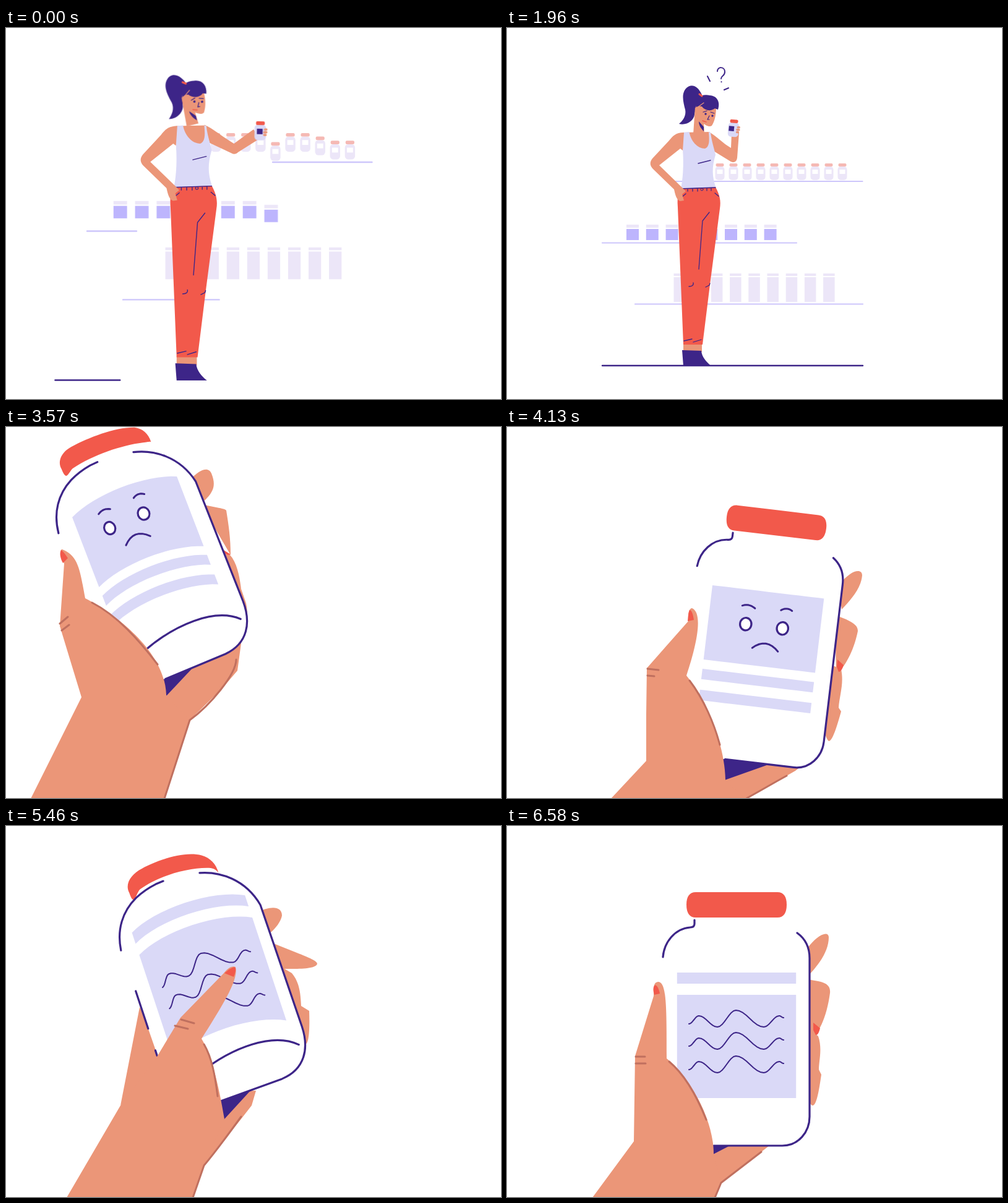
Write an HTML page that moves like this. It is 800 px wide and 600 px high and loops after 6650 ms.

```html
<!DOCTYPE html>
<html lang="en">
<head>
<meta charset="utf-8">
<title>Reading the label</title>
<style>
html, body { margin: 0; width: 100%; height: 100%; overflow: hidden; background: #fff; }
svg { display: block; width: 800px; height: 600px; }
</style>
</head>
<body>
<svg viewBox="0 0 800 600">
  <filter id="rough" filterUnits="userSpaceOnUse" x="0" y="0" width="800" height="600" color-interpolation-filters="sRGB">
    <feTurbulence id="noise" type="fractalNoise" baseFrequency=".04" numOctaves="1"/>
    <feDisplacementMap in="SourceGraphic" scale="1.3" xChannelSelector="R" yChannelSelector="G"/>
  </filter>
  <g id="stage" filter="url(#rough)" stroke-linecap="round" stroke-linejoin="round"></g>
</svg>
<script>
const LOOP = 6650, STEP = 70, CUT = 3360;
const SKIN = '#eb9678', RED = '#f2594b', INK = '#3d2588', LILAC = '#dad9f7',
      BROWN = '#c0705f', PALE = '#ece6f8', VIOLET = '#bdb5fd', SHELF = '#cdc6fb', PINK = '#f5b9b4';

const clamp = (x, a = 0, b = 1) => Math.min(b, Math.max(a, x));
const span = (t, a, b) => clamp((t - a) / (b - a));
const lerp = (a, b, t) => a + (b - a) * t;
const inOut = t => t * t * (3 - 2 * t);
const out = t => 1 - (1 - t) ** 3;
const backOut = t => 1 + 3.2 * (t - 1) ** 3 + 2.2 * (t - 1) ** 2;
const NUM = /-?\d+(\.\d+)?/g;

// Blend two paths that share the same commands
function mix(a, b, t) {
  const to = b.match(NUM);
  let i = 0;
  return a.replace(NUM, n => lerp(+n, +to[i++], t).toFixed(2));
}
function shift(d, dx, dy) {
  let i = 0;
  return d.replace(NUM, n => +n + (i++ % 2 ? dy : dx));
}
const fill = (d, color) => `<path d="${d}" fill="${color}"/>`;
const line = (d, color, width) => `<path d="${d}" fill="none" stroke="${color}" stroke-width="${width}"/>`;
const rect = (x, y, w, h, color, r = 0) =>
  `<rect x="${x}" y="${y}" width="${w}" height="${h}" rx="${r}" fill="${color}"/>`;
const group = (transform, body) => `<g transform="${transform}">${body}</g>`;

// ---------- Woman and shelves ----------

const ARM_OUT = 'M326,167 C338,172 350,183 370,195 L399,174 L409,187 L376,208 C373,211 370,211 366,209 L334,194Z';
const ARM_BENT = 'M326,168 C338,174 348,186 362,194 L363,170 L375,170 L372,210 C371,217 366,219 360,215 L334,199Z';

function shelves(t, p) {
  const row = (count, item, lift) => Array.from({ length: count }, (_, i) =>
    group(`translate(0 ${lift(i) * (1 - out(span(t, i * 20, 420 + i * 20)))})`, item(i))).join('');
  const hover = [-13, -13, -13, -13, 0, -13, -13, -8, -2, -2];
  const jars = row(10, i => {
    const x = 344 + 22 * i;
    return rect(x - 7.5, 224, 15, 22, PALE, 5) + rect(x - 6.5, 219, 13, 5, PINK, 2) + rect(x - 4.5, 229, 9, 7, '#fff');
  }, i => hover[i]);
  const boxes = row(8, i => {
    const x = 193 + 31.8 * i;
    return rect(x, 318, 20, 5, PALE) + rect(x, 325, 20, 18, VIOLET);
  }, i => i < 7 ? -14 : -8.5);
  const tubes = row(9, i => {
    const x = 269.5 + 30.2 * i;
    return rect(x, 397, 18.5, 4, PALE) + rect(x, 403, 18.5, 40, PALE);
  }, () => -26);
  const board = (x0, x1, y) => line(`M${x0},${y} H${x1}`, SHELF, 2.2);
  const k = 1 - p;
  return group(`translate(${-37.6 * k} ${-60.7 * k}) scale(${1 + .095 * k} ${1 + .12 * k})`,
    jars + boxes + tubes + board(lerp(428, 271, p), 574.5, 248) +
    board(154, lerp(227, 468, p), 347.5) + board(207, lerp(349, 575, p), 446.5));
}

function head(q) {
  const k = 1 - q;
  return group(`translate(${-3 * k} ${-4 * k}) rotate(${-14 * k} 308 165)`,
    fill('M315,108 C308,92 297,90 290,97 C281,106 285,120 288,132 C290,142 284,150 278,155 C290,158 302,150 303,140 C305,130 308,118 315,108Z', INK) +
    fill('M304,128 L301,172 L319,172 L318,152Z', SKIN) +
    fill('M310,151 L318,160 L318,167 C314,163 310,158 310,151Z', INK) +
    fill('M308,120 L338,128 C338,140 336,150 331,158 C327,161 320,157 316,153 C308,150 303,142 304,131Z', SKIN) +
    fill('M306,128 C304,114 312,106 328,109 C340,110 345,120 341,132 L336,130 C330,135 320,134 315,127 L310,126Z', INK) +
    line('M311,126 L318,121', SKIN, 1.2) + line('M311,107 L315,110', RED, 3) +
    line('M317,136 L323,134 M329,136 L335,138 M327,142 L324,148 L327,148', INK, 1.2) +
    line('M316,150 L322,152', RED, 1.4) +
    `<circle cx="321" cy="139" r="1.7" fill="${INK}"/><circle cx="332" cy="142" r="1.7" fill="${INK}"/>`);
}

function heldJar(q) {
  return group(`translate(${lerp(409, 366, q)} ${lerp(177, 163, q)}) rotate(${lerp(1, 5, q)})`,
    rect(-8.5, -10, 17, 23, LILAC, 5) + rect(-6.5, -15, 13, 5.5, RED, 2) + rect(-5 - 2.5 * q, -4, 8.5, 8, INK) +
    line('M7,-3 H9 M6,1 H9 M6,5 H8', SKIN, 3.4));
}

function woman(t, p, q) {
  const k = 1 - p, pop = backOut(span(t, 1050, 1330));
  const ink = d => line(d, INK, 1.3);
  const ground = line(`M${lerp(105, 154, p)},546 H${lerp(201, 575, p)}`, INK, 2.4);
  const body =
    fill('M285,510 H315 V524 H285Z', SKIN) +
    fill('M283,521 L314,522 C315,532 322,540 330,546.5 L285,546.5Z', INK) +
    fill(mix(ARM_OUT, ARM_BENT, q), SKIN) +
    fill('M284,169 L328,168 L332,200 L285,205Z', SKIN) +
    fill('M285,169 L294.5,168 C297,183 308,195 320,195 C328,192 327,180 326,168 L329,169 C331,185 335,195 337,205 C331,225 331,240 338,259 L281,260 C286,235 285,210 284,195Z', LILAC) +
    fill('M277,260 L337,257.5 C344,270 346,280 344,292 L328,415 L316,512 L285,512 L276,290 C275,280 276,270 277,260Z', RED) +
    ink('M309,219 L329,214 M278,260 L337,258 M292,260 V264 M300,260 V264 M308,260 V264 M323,259 V263 M330,259 V263') +
    ink('M283,273 L289,268 M336,267 L342,272 M327,298 L316,312 L310,390 M294,418 C299,418 302,416 301,412 M321,419 L327,416 L328,413 M286,506 L299,503 M301,508 L314,504') +
    `<circle cx="315" cy="261" r="2" fill="none" stroke="${INK}"/>` +
    fill('M286,169 C272,169 268,175 262,182 L235,211 C230,217 231,223 236,228 L270,261 C272,270 274,278 280,280 L286,279 L283,269 L289,264 L283,258 L246,222 L280,195 L284,198Z', SKIN) +
    head(q) + heldJar(q);
  const doubt = t < 1050 ? '' : group(`translate(335 100) scale(${pop}) translate(-335 -100)`,
    line('M340,70 C340,62 352,62 352,71 C352,78 346,77 346,82 M346.5,87 V87.3 M324,78 L328,86 M351,100 L358,97', INK, 2));
  return group(`translate(${-34.9 * k} ${-25.6 * k}) scale(${1 + .09 * k})`, ground + body + doubt);
}

// ---------- Bottle, drawn around its own centre ----------

const FLAT = {
  cap: 'M-81,-203 C-81,-216 -76,-223 -66,-223 C-22,-223 22,-223 66,-223 C76,-223 81,-216 81,-203 C81,-189 76,-182 66,-182 C22,-182 -22,-182 -66,-182 C-76,-182 -81,-189 -81,-203Z',
  left: 'M-68,-178 L-68,-172 Q-68,-166 -75,-166 C-100,-164 -117,-142 -119,-118',
  right: 'M98,-157 C112,-147 118,-132 118,-116 L118,140 C118,165 100,187 74,187 L-37,187',
  side: 'L-118,187 L-119,-118 C-117,-142 -100,-164 -75,-166 L-68,-178Z',
  base: 'M-37,187 C0,187 40,187 74,187'
};
const TILTED = {
  cap: 'M-80,-160 C-83,-176 -68,-188 -48,-191 C-20,-196 25,-197 50,-181 C62,-173 68,-160 67,-146 C64,-153 62,-155 55,-158 C25,-169 -25,-172 -62,-160 C-70,-156 -80,-134 -80,-160Z',
  left: 'M-22,-161 L-35,-160 Q-55,-157 -72,-149 C-100,-135 -118,-110 -122,-76',
  right: 'M38,-155 C70,-147 105,-122 115,-75 L117,133 C117,170 100,200 60,203 L-45,206',
  side: 'L-118,187 L-122,-76 C-118,-110 -100,-135 -72,-149 L-22,-161Z',
  base: 'M-62,152 C0,129 70,127 103,159'
};
const WAVE = [[-77, -10], [-61, -23], [-31, -5], [-1, -32], [44, -5], [69, -23], [76, -20]];

function bottle([x, y, turn, tilt, spin, capTilt]) {
  const R = 118, rad = Math.PI / 180;
  const shape = (name, s = tilt) => mix(FLAT[name], TILTED[name], s);
  const onSurface = (deg, h) => {
    const a = clamp(deg, -90, 90) * rad;
    return `${(R * Math.sin(a)).toFixed(2)},${(h + 45 * tilt * (.58 - Math.cos(a))).toFixed(2)}`;
  };
  const degOf = u => Math.asin(u / R) / rad;
  const band = (mid, half, top, bottom) => {
    const pts = [];
    for (let i = -8; i <= 8; i++) pts.push(onSurface(mid + half * i / 8, top));
    for (let i = 8; i >= -8; i--) pts.push(onSurface(mid + half * i / 8, bottom));
    return fill('M' + pts.join('L') + 'Z', LILAC);
  };
  const trace = (mid, pts, width) =>
    line('M' + pts.map(([u, v]) => onSurface(mid + degOf(u), v)).join('L'), INK, width);
  const arc = (u0, v0, u1, v1, rise) => Array.from({ length: 9 }, (_, i) => {
    const s = i / 8;
    return [lerp(u0, u1, s), lerp(v0, v1, s) - rise * 4 * s * (1 - s) - 4 * tilt];
  });
  const wave = dy => WAVE.slice(1).flatMap(([u1, v1], j) => {
    const [u0, v0] = WAVE[j];
    return Array.from({ length: 9 }, (_, i) =>
      [lerp(u0, u1, i / 8), lerp(v0, v1, (1 - Math.cos(Math.PI * i / 8)) / 2) + dy]);
  });

  let labels = '';
  if (spin < 130) {
    labels += band(spin, 50.3, -90, 31) + band(spin, 50.3, 46, 63) + band(spin, 50.3, 80, 97);
    const face = spin - 5 * tilt;
    for (const side of [-14.7, 14.7]) {
      const deg = face + side;
      if (deg > 85) continue;
      const [cx, cy] = onSurface(deg, -34 - 4 * tilt).split(',');
      labels += `<ellipse cx="${cx}" cy="${cy}" rx="${9.5 * Math.cos(deg * rad)}" ry="10.2" fill="#fff" stroke="${INK}" stroke-width="3.2"/>`;
    }
    labels += trace(face, arc(-39, -63, -18, -61, 3), 3) + trace(face, arc(24, -63, 42, -64, 3), 3) +
      trace(face, arc(-15, 3, 27, 4, 10), 3);
  }
  if (spin > 5) {
    const mid = spin - 135, grow = 1 + .05 * tilt;
    labels += band(mid, 54.6, -93 * grow, -75 * grow) + band(mid, 54.6, -57 * grow, 110 * grow);
    for (const dy of [0, 36, 74]) labels += trace(mid, wave(dy + 20 * tilt), 2);
  }
  const body = shape('right') + shape('side');
  const edge = tilt > .9 && spin > 40 ? line('M-120,-6 V58 M-120,95 V104', INK, 3.2) : '';
  return group(`translate(${x} ${y}) rotate(${turn})`,
    `<clipPath id="body"><path d="${body}"/></clipPath>` +
    fill(shape('cap', capTilt), RED) + fill(body, '#fff') + `<g clip-path="url(#body)">${labels}</g>` +
    line(shape('left') + shape('right') + shape('base'), INK, 3.2) + edge);
}

// ---------- Hand poses; bottle: x, y, turn, tilt, spin, cap tilt ----------

const LOW = {
  bottle: [226, 199, -21, 1, -1, .75],
  hand: 'M40,601 L122,437 L104,378 L87,322 L94,221 C88,205 87,197 91,198 C118,208 120,235 128,277 C190,310 258,370 259,434 L297,474 L256,601Z',
  palm: 'M256,601 L297,474 L350,422 L374,394 L382,335 L280,330 L230,590Z M122,437 L130,380 L150,400Z',
  gap: 'M252,402 L306,385 L259,435Z',
  web: 'M139,284 C180,305 215,345 245,384',
  rim: 'M372,376 C372,400 330,450 297,474 L256,601',
  crease: 'M87,318 L100,307 M90,329 L102,320',
  nail: 'M89,199 C94,202 97,208 100,212 L92,220 C88,213 86,204 89,199Z',
  fingers: 'M295,88 C315,65 328,65 332,75 C340,95 335,105 321,119Z M315,125 L340,130 C350,132 355,133 356,135 C360,160 363,180 363,207Z M345,200 L362,207 C374,220 378,245 380,262 L388,285 C391,300 391,320 386,322 C382,320 378,315 370,300Z',
  tip: 'M350,198 L363,206 C360,208 357,206 355,205 L350,202Z'
};
const FRONT = {
  bottle: [411.5, 356, 6.8, 0, 0, 0],
  hand: 'M168,601 L225,540 L225,465 L226,390 L293,314 C292,300 295,293 299,293 C316,300 309,345 290,402 C320,440 352,510 353,571 L385,601 L385,601Z',
  palm: 'M380,601 L388,601 L452,564 L466,556 L480,545 L330,520 L330,601Z M225,540 L240,450 L270,430Z',
  gap: 'M345,530 L428,544 L352,571Z',
  web: 'M295,410 C318,440 335,480 344,514',
  rim: 'M452,564 C430,576 410,588 388,600 L386,602',
  crease: 'M227,391 L245,393 M227,402 L238,403',
  nail: 'M295,296 C299,296 301,305 302,312 L292,314 C293,306 293,300 295,296Z',
  fingers: 'M535,258 C555,230 574,228 574,240 C572,262 555,280 541,295Z M530,304 L548,311 C562,318 567,322 567,330 C562,355 550,385 532,400Z M525,385 L540,392 C545,415 537,435 536,454 L540,460 C533,485 526,508 520,508 C516,505 514,495 510,485Z',
  tip: 'M534,376 L544,385 C542,392 539,396 536,396 L533,388Z'
};
const BACK = {
  bottle: [325.5, 235, -18.3, 1, 135, 1],
  hand: 'M98,601 L185,452 L244,373 L282,310 L352,238 C360,228 366,226 371,228 C375,245 362,272 316,344 C332,370 344,420 353,474 L320,549 L302,601Z',
  palm: 'M302,601 L320,549 L383,470 L397,452 L404,428 L340,430 L290,560Z M185,452 L216,293 L260,373Z',
  gap: 'M345,440 L395,428 L352,475Z',
  web: 'M320,353 C333,375 338,405 342,437',
  rim: 'M380,470 C362,495 340,525 320,549 L302,601',
  crease: 'M283,313 L304,319 M273,323 L294,328',
  nail: 'M366,229 C372,226 373,232 368,244 L353,238 C358,234 361,231 366,229Z',
  fingers: 'M405,140 C425,130 446,128 446,145 C444,155 436,165 428,172Z M425,187 L470,205 C490,213 503,218 503,223 C500,232 470,231 445,231Z M440,225 L462,238 C474,252 476,270 477,291 L490,299 C491,325 490,352 484,353 C480,353 476,340 470,330Z',
  tip: 'M405,150 L410,150 C412,152 412,154 411,156 L406,154Z'
};
const TURNING = Object.fromEntries(Object.entries(BACK).map(([k, v]) => [k, k === 'bottle' ? v : shift(v, 2, 8)]));
Object.assign(TURNING, {
  bottle: [328, 253, -17, 1, 78, 1],
  gap: shift(BACK.gap, 5, 10),
  fingers: 'M410,150 C430,155 455,180 461,202 C455,205 445,205 435,190Z M435,190 L465,207 C495,221 512,230 513,233 C508,242 480,241 455,240Z M445,230 L470,250 C484,265 482,285 484,309 L494,315 C495,340 492,368 487,368 C482,369 480,360 475,345Z',
  tip: 'M447,187 L457,187 C462,194 462,200 461,203 L452,197Z'
});
const READ = {
  bottle: [371, 330, 0, 0, 135, 0],
  hand: 'M138,601 L205,510 L206,440 L207,372 L237,275 C238,258 236,254 244,252 C258,252 258,290 258,376 C290,400 334,470 334,530 L346,577 L336,601Z',
  palm: 'M336,601 L346,577 L411,527 L420,520 L430,512 L320,500 L300,590Z M205,510 L230,420 L250,400Z',
  gap: 'M333,515 L364,515 L333,531Z',
  web: 'M262,381 C285,400 306,435 322,475',
  rim: 'M411,527 C390,543 368,560 346,577 L336,601',
  crease: 'M208,373 L223,373 M208,384 L224,384',
  nail: 'M238,258 C242,256 245,262 247,271 L238,273 C236,266 236,262 238,258Z',
  fingers: 'M480,205 C500,175 520,168 520,180 C520,205 500,228 489,240Z M480,247 L503,251 C518,254 523,260 522,270 C518,300 508,335 485,350Z M480,320 L503,340 C510,360 504,380 504,394 L508,402 C504,430 500,452 494,452 C490,452 486,440 480,430Z',
  tip: 'M495,318 L506,327 C504,335 502,338 499,338 L495,330Z'
};
const KEYS = [[CUT, LOW], [3640, LOW], [3920, FRONT], [4340, FRONT], [4690, TURNING],
  [4900, TURNING], [5250, BACK], [5670, BACK], [6160, READ], [LOOP, READ]];

function closeUp(t) {
  const i = KEYS.findIndex(([end]) => end > t);
  const [start, a] = KEYS[i - 1], [end, b] = KEYS[i];
  const s = inOut(span(t, start, end));
  const part = name => mix(a[name], b[name], s);
  const late = Math.max(0, (3570 - t) / STEP);
  const sway = 9 * Math.sin(Math.PI * span(t, 3850, 4130));
  return group(`translate(${sway - 42 * late ** 1.7} ${10 * late})`,
    fill(part('fingers'), SKIN) + fill(part('tip'), RED) +
    fill(part('palm'), SKIN) + fill(part('gap'), INK) +
    bottle(a.bottle.map((v, j) => lerp(v, b.bottle[j], s))) +
    fill(part('hand'), SKIN) + fill(part('nail'), RED) +
    line(part('web') + part('rim') + part('crease'), BROWN, 3));
}

const stage = document.getElementById('stage'), noise = document.getElementById('noise');
let shown = -1;

function render(now) {
  const step = Math.floor((now % LOOP) / STEP);
  if (step === shown) return;
  shown = step;
  const t = step * STEP;
  noise.setAttribute('seed', step % 8 + 1);
  if (t < CUT) {
    const p = out(span(t, 0, 700)), q = inOut(span(t, 350, 900));
    stage.innerHTML = shelves(t, p) + woman(t, p, q);
  } else {
    stage.innerHTML = closeUp(t);
  }
}

const begin = performance.now();
function tick() {
  render(performance.now() - begin);
  requestAnimationFrame(tick);
}
tick();
</script>
</body>
</html>
```
